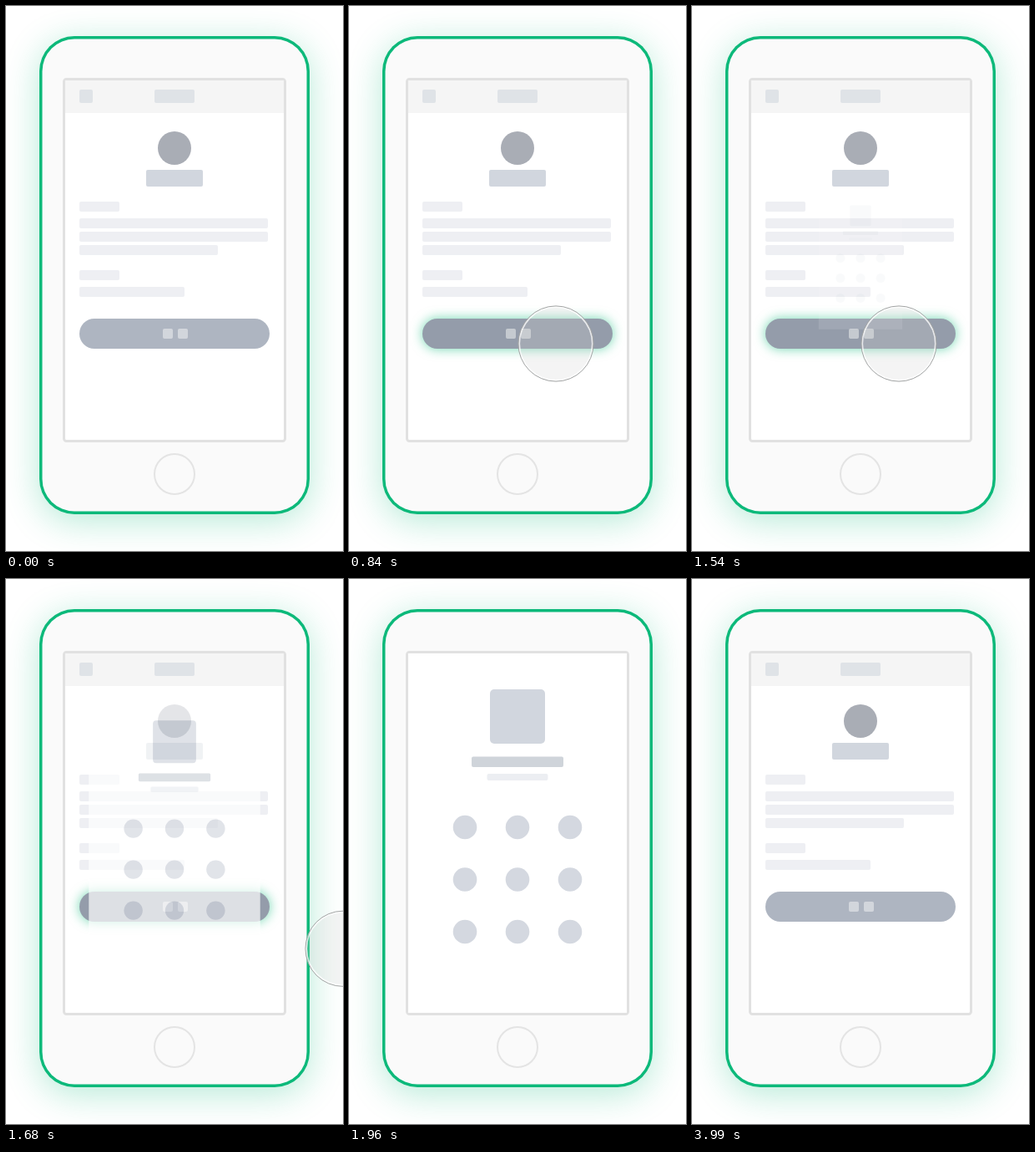
Animation, 404 px wide and 652 px high, one loop 4480 ms. Source, as an HTML page with a canvas:

```html
<!DOCTYPE html>
<html lang="en">
<head>
<meta charset="utf-8">
<title>Phone confirmation</title>
<style>
  html, body { margin: 0; width: 100%; height: 100%; overflow: hidden; background: #fff; }
  canvas { display: block; }
</style>
</head>
<body>
<canvas id="stage" width="404" height="652"></canvas>
<script>
const W = 404, H = 652, LOOP = 4480, STEP = 70;
const stage = document.getElementById('stage').getContext('2d');
const layer = document.createElement('canvas');
layer.width = W;
layer.height = H;
const sheet = layer.getContext('2d');

const clamp = v => Math.min(1, Math.max(0, v));
const mix = (a, b, p) => a + (b - a) * p;

// cubic-bezier(.25, .1, .25, 1)
function ease(x) {
  if (x <= 0 || x >= 1) return clamp(x);
  const curve = (a, b, u) => 3 * a * u * (1 - u) ** 2 + 3 * b * u * u * (1 - u) + u ** 3;
  let lo = 0, hi = 1;
  for (let i = 0; i < 24; i++) {
    const mid = (lo + hi) / 2;
    if (curve(0.25, 0.25, mid) < x) lo = mid; else hi = mid;
  }
  return curve(0.1, 1, lo);
}
const during = (t, start, length) => ease((t - start) / length);

function box(c, x, y, w, h, r, fill) {
  c.beginPath();
  c.roundRect(x, y, w, h, r);
  c.fillStyle = fill;
  c.fill();
}

function outline(c, color, width) {
  c.strokeStyle = color;
  c.lineWidth = width;
  c.stroke();
}

function disc(c, x, y, r, fill) {
  c.beginPath();
  c.arc(x, y, r, 0, Math.PI * 2);
  if (fill) {
    c.fillStyle = fill;
    c.fill();
  }
}

function glow(c, color, blur, dy) {
  c.shadowColor = color;
  c.shadowBlur = blur;
  c.shadowOffsetY = dy;
}

function drawPhone(c) {
  c.save();
  glow(c, 'rgba(12,185,122,0.3)', 42, 8);
  box(c, 40, 36, 324, 572, 42, '#0cb97a');
  c.restore();
  box(c, 43.5, 39.5, 317, 565, 38.5, '#fafafa');
  box(c, 69.5, 87.5, 265, 433, 3, '#fff');
  outline(c, '#e1e1e1', 3);
  disc(c, 202, 560, 24);
  outline(c, '#e4e4e4', 2);
}

function drawButton(c, hover) {
  const rgb = [mix(174, 148, hover), mix(181, 156, hover), mix(193, 170, hover)].map(Math.round);
  c.save();
  if (hover) glow(c, `rgba(12,185,122,${0.6 * hover})`, 14, 0);
  box(c, 88, 374, 228, 36, 18, `rgb(${rgb})`);
  c.restore();
  for (const x of [188, 206]) box(c, x, 386, 12, 12, 2, hover > 0.5 ? '#c5cad0' : '#d2d6dc');
}

function drawForm(c, hover) {
  box(c, 71, 89, 262, 39, 0, '#f5f5f5');
  box(c, 88, 100, 16, 16, 2, '#dfe3e7');
  box(c, 178, 100, 48, 16, 2, '#dfe3e7');
  disc(c, 202, 170, 20, '#a9adb5');
  box(c, 168, 196, 68, 20, 2, '#d1d6de');
  const lines = [[234, 48], [254, 226], [270, 226], [286, 166], [316, 48], [336, 126]];
  for (const [y, w] of lines) box(c, 88, y, w, 12, 2, '#eeeff3');
  drawButton(c, hover);
}

function drawKeypad(c, scale, alpha) {
  sheet.clearRect(0, 0, W, H);
  sheet.save();
  sheet.translate(202, 304.5);
  sheet.scale(scale, scale);
  sheet.translate(-202, -304.5);
  box(sheet, 71, 89, 262, 430, 0, '#fff');
  box(sheet, 169, 132, 66, 65, 5, '#d1d6de');
  box(sheet, 147, 212.5, 110, 12.5, 2, '#cfd4da');
  box(sheet, 165.5, 233, 73, 8, 2, '#eceef2');
  for (const y of [297, 359.5, 422])
    for (const x of [139, 202, 265]) disc(sheet, x, y, 14.3, '#d4d8e0');
  sheet.restore();
  c.globalAlpha = alpha;
  c.drawImage(layer, 0, 0);
  c.globalAlpha = 1;
}

function drawPointer(c, x, y) {
  disc(c, x, y, 45, 'rgba(210,210,210,0.24)');
  disc(c, x, y, 43.8);
  outline(c, 'rgba(255,255,255,0.75)', 1.8);
  disc(c, x, y, 45.1);
  outline(c, '#a3a5a5', 1);
}

function draw(t) {
  const enter = during(t, 350, 490);
  const leave = during(t, 1540, 490);
  const open = during(t, 1485, 480);
  const close = during(t, 3660, 240);
  const hover = t < 2100 ? clamp((t - 660) / 140) : 0;

  stage.fillStyle = '#fff';
  stage.fillRect(0, 0, W, H);
  drawPhone(stage);
  drawForm(stage, hover);
  if (open > 0 && close < 1) drawKeypad(stage, mix(0.3, 1, open), open * (1 - close));
  if (t >= 350 && leave < 1)
    drawPointer(stage, mix(430, 248, enter) + 322 * leave, mix(585, 404, enter) + 79 * leave);
}

function tick() {
  const t = performance.now() % LOOP;
  draw(Math.floor(t / STEP) * STEP);
  requestAnimationFrame(tick);
}
tick();
</script>
</body>
</html>
```
